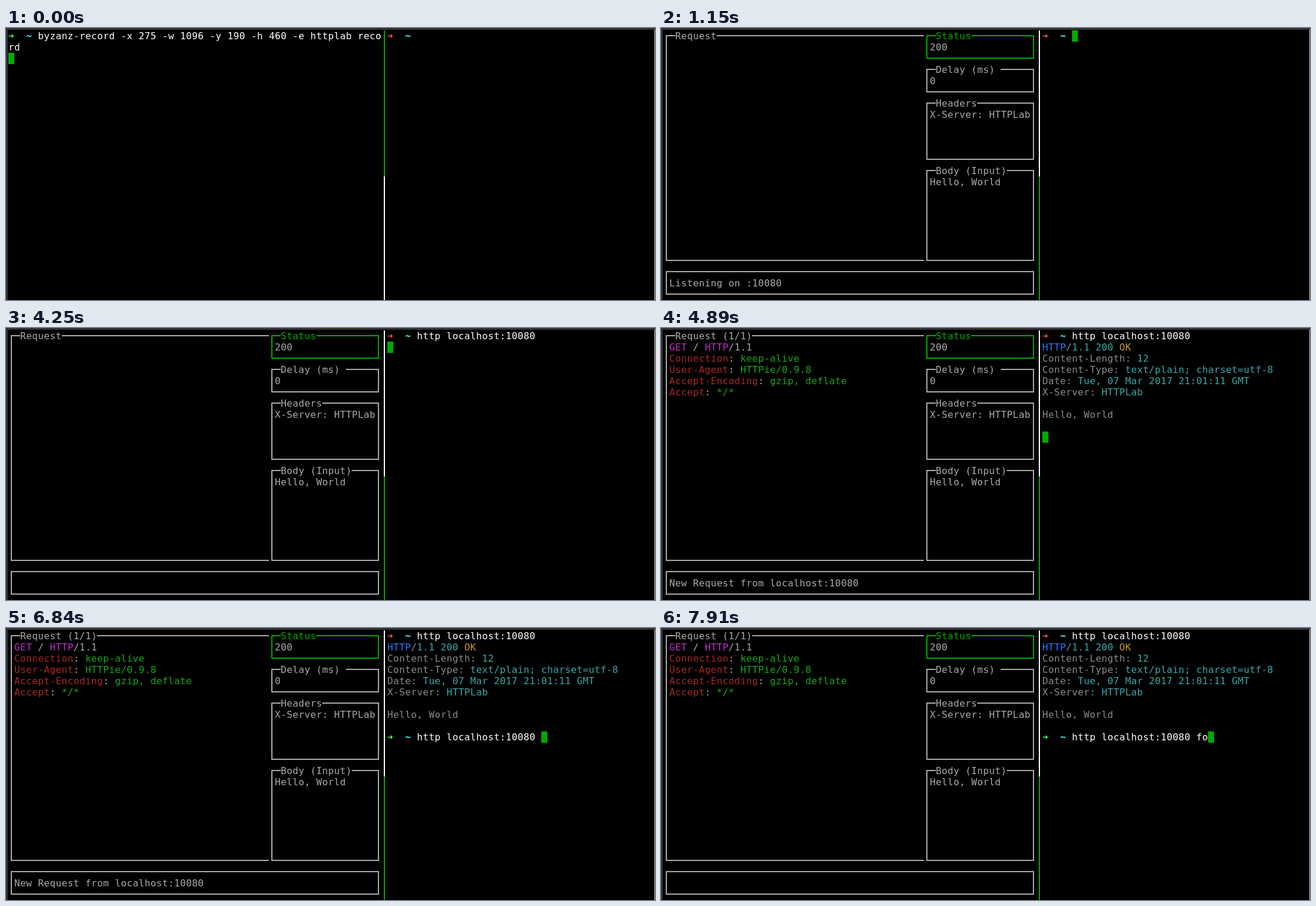
Write an HTML page that moves like this. It is 1096 by 460 pixels and loops after 8 s.

```html
<!DOCTYPE html>
<html lang="en">
<head>
<meta charset="utf-8">
<title>Terminal session</title>
<style>
  html, body { margin: 0; width: 100%; height: 100%; overflow: hidden; background: #000; }
  svg { display: block; width: 1096px; height: 460px; }
  text { font: 16px "DejaVu Sans Mono", monospace; white-space: pre; }
  .bold { font-weight: bold; }
</style>
</head>
<body>
<svg id="stage" viewBox="0 0 1096 460"></svg>
<script>
const LOOP = 8000, CELL = 10, LINE = 19, ORIGIN = 4, RIGHT = 64;
const GREY = '#aaa', WHITE = '#fff', GREEN = '#00aa00', LIME = '#55ff55', ROSE = '#ff5555', AQUA = '#55ffff';
const MAGENTA = '#c030c8', RED = '#a82828', LEAF = '#18a818';
const DIM = '#8a8a8a', TEAL = '#3aa8a8', BLUE = '#2a78ff', GOLD = '#c89a1a';

const colX = col => ORIGIN + col * CELL;
const rowY = row => ORIGIN + row * LINE;
const rect = (x, y, w, h, fill) => `<rect x="${x}" y="${y}" width="${w}" height="${h}" fill="${fill}"/>`;
const cursor = (col, row) => rect(colX(col), rowY(row), CELL, LINE, GREEN);

// Every glyph sits in its own terminal cell.
function text(col, row, str, fill = GREY, bold = false) {
  const xs = [...str].map((_, i) => colX(col + i)).join(' ');
  return `<text x="${xs}" y="${rowY(row) + 15}" fill="${fill}"${bold ? ' class="bold"' : ''}>${str}</text>`;
}

// Alternating strings and colours on one line.
function runs(col, row, ...parts) {
  let out = '';
  for (let i = 0; i < parts.length; i += 2) {
    out += text(col, row, parts[i], parts[i + 1]);
    col += parts[i].length;
  }
  return out;
}

const prompt = (col, row, arrow) =>
  text(col, row, '➜', arrow, true) + text(col + 3, row, '~', AQUA, true);

function box(col, row, endCol, endRow, title = '', color = GREY, open = false) {
  const l = colX(col) + 5, t = rowY(row) + 9, b = rowY(endRow) + 9;
  const r = open ? colX(endCol) : colX(endCol) + 5;
  const gap = colX(col + 2), resume = gap + title.length * CELL;
  const side = open ? `M${r} ${t}` : `V${t}`;
  const d = `M${gap} ${t}H${l}V${b}H${r}${side}H${resume}`;
  return `<path d="${d}" fill="none" stroke="${color}" stroke-width="2"/>` + text(col + 2, row, title, color);
}

const frameEdge = rect(0, 0, 1096, 460, '#000') + rect(0, 0, 1096, 3, '#333') +
  rect(0, 0, 3, 460, '#333') + rect(1095, 3, 1, 457, '#c8c8c8');

function divider(rightActive) {
  const [top, bottom] = rightActive ? [WHITE, GREEN] : [GREEN, WHITE];
  return rect(638, 4, 2, 247, top) + rect(638, 251, 2, 209, bottom);
}

function shell() {
  return prompt(0, 0, LIME) +
    text(5, 0, 'byzanz-record -x 275 -w 1096 -y 190 -h 460 -e httplab reco', WHITE) +
    text(0, 1, 'rd', WHITE) + cursor(0, 2);
}

function request() {
  const header = (row, name, value) => runs(1, row, name, RED, ': ', GREY, value, LEAF);
  return runs(1, 1, 'GET', MAGENTA, ' / ', GREY, 'HTTP', MAGENTA, '/1.1', GREY) +
    header(2, 'Connection', 'keep-alive') +
    header(3, 'User-Agent', 'HTTPie/0.9.8') +
    header(4, 'Accept-Encoding', 'gzip, deflate') +
    header(5, 'Accept', '*/*');
}

function lab(s) {
  return box(0, 0, 44, 20, s.answered ? 'Request (1/1)' : 'Request', GREY, true) +
    box(44, 0, 62, 2, 'Status', GREEN) +
    (s.rightActive ? '' : cursor(45, 1)) +
    (s.rightActive ? text(45, 1, '200') : runs(45, 1, '2', '#000', '00', GREY)) +
    box(44, 3, 62, 5, 'Delay (ms) ') + text(45, 4, '0') +
    box(44, 6, 62, 11, 'Headers') + text(45, 7, 'X-Server: HTTPLab') +
    box(44, 12, 62, 20, 'Body (Input)') + text(45, 13, 'Hello, World') +
    box(0, 21, 62, 23) + text(1, 22, s.message) +
    (s.answered ? request() : '');
}

function response() {
  const header = (row, name, value) => runs(RIGHT, row, name + ': ', DIM, value, TEAL);
  return runs(RIGHT, 1, 'HTTP', BLUE, '/', DIM, '1.1 200 ', TEAL, 'OK', GOLD) +
    header(2, 'Content-Length', '12') +
    header(3, 'Content-Type', 'text/plain; charset=utf-8') +
    header(4, 'Date', 'Tue, 07 Mar 2017 21:01:11 GMT') +
    header(5, 'X-Server', 'HTTPLab') +
    text(RIGHT, 7, 'Hello, World', DIM);
}

function client(s) {
  const input = RIGHT + 5;
  let out = prompt(RIGHT, 0, ROSE) + text(input, 0, s.first, WHITE);
  if (s.answered) out += response();
  if (s.prompted) out += prompt(RIGHT, 9, LIME) + text(input, 9, s.second, WHITE);
  if (!s.rightActive) return out;
  if (s.prompted) return out + cursor(input + s.second.length, 9);
  if (s.answered) return out + cursor(RIGHT, 9);
  return out + (s.sent ? cursor(RIGHT, 1) : cursor(input + s.first.length, 0));
}

const COMMAND = 'http localhost:10080 ';
const start = {
  started: false, rightActive: false, sent: false, answered: false, prompted: false,
  message: '', first: '', second: ''
};
const events = [
  [40, { started: true, message: 'Listening on :10080' }],
  [1150, { rightActive: true }],
  [3010, { message: '' }],
  [3520, { first: COMMAND }],
  [4250, { sent: true }],
  [4890, { answered: true, message: 'New Request from localhost:10080' }],
  [4930, { prompted: true }],
  [6840, { second: COMMAND }],
  [7780, { second: COMMAND + 'f' }],
  [7870, { message: '' }],
  [7910, { second: COMMAND + 'fo' }]
];

const stage = document.getElementById('stage');
let shown = -1;

function draw(time) {
  const past = events.filter(([at]) => at <= time);
  if (past.length === shown) return;
  shown = past.length;
  const s = Object.assign({}, start, ...past.map(([, change]) => change));
  stage.innerHTML = frameEdge + divider(s.rightActive) + (s.started ? lab(s) : shell()) + client(s);
}

const begin = performance.now();
function tick() {
  draw((performance.now() - begin) % LOOP);
  requestAnimationFrame(tick);
}
draw(0);
requestAnimationFrame(tick);
</script>
</body>
</html>
```
